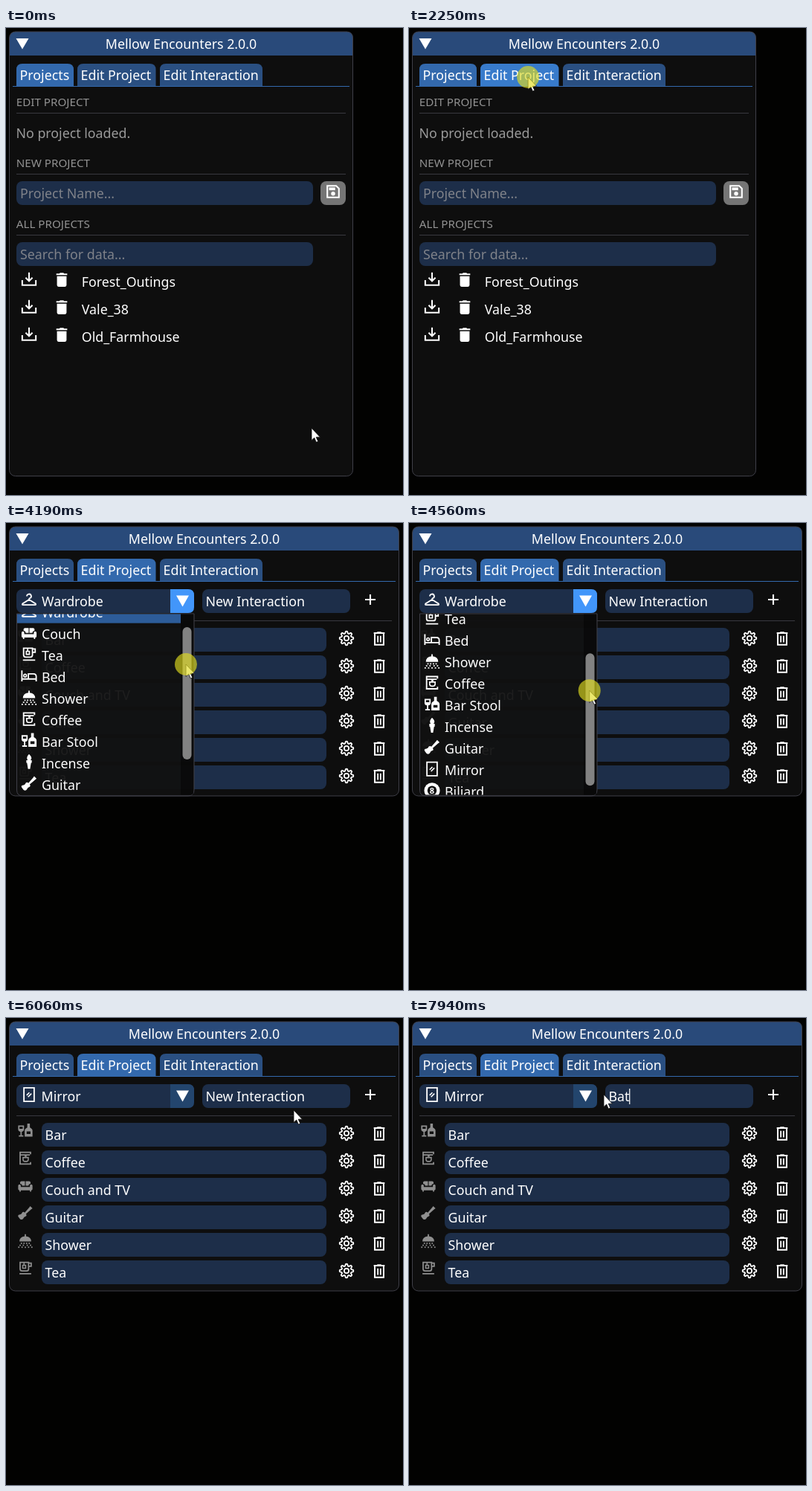
Animation, 534 px wide and 628 px high, one loop 8000 ms. Source, as an HTML page:

```html
<!DOCTYPE html>
<html lang="en">
<head>
<meta charset="utf-8">
<title>Project editor</title>
<style>
  html, body { margin: 0; width: 100%; height: 100%; overflow: hidden; background: #020201; }
  svg { display: block; width: 534px; height: 628px; }
  text { font: 17.8px "Noto Sans", sans-serif; fill: #fff; white-space: pre; }
</style>
</head>
<body>
<svg id="stage" viewBox="0 0 534 628"></svg>
<script>
const LOOP = 8000;
const FRAME = '#1d2e49', FRAME_HOVER = '#23456d', BUTTON = '#23456d', BRIGHT = '#4296fa';
const TAB = '#2a4f81', TAB_ON = '#3369ad', HOVER = '#387bcb', LINE = '#393940', MUTED = '#929292';

// Moments of the interaction
const SWITCH = 2310, OPEN = 3190, GRAB = 4060, DROP = 4920, PICK = 5480, SELECT = 6350;
const TYPED = [[7560, 'B'], [7750, 'Ba'], [7940, 'Bat']];
const CLICKS = [[1600, 1760], [2240, 2330], [3080, 3200], [GRAB, DROP], [5400, 5500], [SELECT, 7150]];
const PATH = [
  [60, 411, 538], [810, 31, 427], [940, 31, 427], [1250, 28, 422], [1690, 28, 422],
  [2230, 160, 66], [2380, 162, 66], [2600, 222, 52], [3060, 193, 119], [3200, 193, 119],
  [3600, 205, 278], [3940, 242, 175], [4080, 242, 175], [4190, 242, 190], [4750, 243, 238],
  [4930, 243, 238], [5190, 167, 308], [5400, 166, 315], [5750, 166, 315], [6060, 387, 124],
  [6250, 408, 108], [6370, 406, 107], [7050, 253, 102], [7300, 262, 103]
];

const rect = (x, y, w, h, fill, r = 0, more = '') =>
  `<rect x="${x}" y="${y}" width="${w}" height="${h}" rx="${r}" fill="${fill}" ${more}/>`;
const text = (x, mid, s, fill = '#fff', more = '') =>
  `<text x="${x}" y="${mid + 6.5}" style="fill:${fill}" ${more}>${s}</text>`;
const hline = (x1, x2, y, color = LINE) =>
  `<path d="M${x1} ${y}H${x2}" stroke="${color}"/>`;
const line = (d, w = 2) => `<path d="${d}" fill="none" stroke="currentColor" stroke-width="${w}"/>`;
const solid = d => `<path d="${d}" fill="currentColor" fill-rule="evenodd"/>`;
const dots = (x, y) => solid(`M${x} ${y}h2v2h-2z`);

function gearPath() {
  let d = '';
  for (let i = 0; i < 64; i++) {
    const a = i * Math.PI / 32, r = 8.7 + 1.5 * Math.tanh(2 * Math.cos(8 * a));
    d += `${i ? 'L' : 'M'}${(12 + r * Math.sin(a)).toFixed(1)} ${(12 - r * Math.cos(a)).toFixed(1)}`;
  }
  return d + 'Z';
}

// Icons on a 24 px grid
const ICONS = {
  hanger: line('M8.8 7a3.2 3.2 0 1 1 4.4 3q-1.2.5-1.2 2L2.5 18q-1.2 1.8.7 1.8h17.6q1.9 0 .7-1.8L12 12'),
  couch: solid('M4 9V7q0-2 2-2h5.4v7H7q0-3-3-3zM20 9V7q0-2-2-2h-5.4v7H17q0-3 3-3zM1 12q0-2 2-2t2 2v2h14v-2q0-2 2-2t2 2v5q0 2-2 2v2h-2v-2H5v2H3v-2q-2 0-2-2z'),
  tea: line('M4 3h13v10q0 3-3 3H7q-3 0-3-3zM17 4h4v5h-4M3 20.5h18') + line('M10 3v4M8 7.5h4.5V12H8z', 1.8),
  bed: line('M1.5 4v16M1.5 16.5h21M22.5 20v-7q0-4-4-4H11v7') + line('M4.2 11.5a2 2 0 1 0 4 0a2 2 0 1 0-4 0', 1.8),
  shower: solid('M3 13q0-7 8-8V2h2v3q8 1 8 8z') +
    [[5, 15], [9, 15], [13, 15], [17, 15], [3, 18], [8, 18], [14, 18], [19, 18], [1, 21], [6, 21], [11, 21], [16, 21], [21, 21]].map(p => dots(...p)).join(''),
  coffee: line('M20 6V3H4v18h16v-3M4 7h15') + line('M8.5 11h8v3q0 3-3 3h-2q-3 0-3-3z', 1.8) + solid('M11 7h3v3h-3z'),
  bar: solid('M1 4h9v6q0 3-3.5 3.6V19H9v2H2v-2h2.5v-5.4Q1 13 1 10zM3 6v3h5V6zM15 1h4v6q4 2 4 5v9H11v-9q0-3 4-5zM14 13v4h6v-4z'),
  incense: solid('M12 0q5 5 3 8l-1 1h2v4h-1l-1.5 9h-3L9 13H8V9h2Q7 5 12 0z'),
  guitar: solid('M19.5 1L23 4.5 21 6l-8 7q2 3-1 4-2 0-3 3-2 3-5 1l-3-4q-1-3 3-3 3-1 3-3 2-2 4 0l7-8z'),
  mirror: line('M4.5 2h15v20h-15z') + line('M8.5 13l4-4M10.5 15.5l5-5', 1.7),
  ball: '<circle cx="12" cy="12" r="11.5" fill="currentColor"/><circle cx="12" cy="12" r="6.8" fill="#111"/>' +
    '<text x="12" y="16.2" text-anchor="middle" style="font-size:12px;font-weight:700">8</text>',
  load: line('M12 2v12M7 9.5l5 5 5-5M2 13v7.5h20V13', 2.2),
  trash: solid('M4 3h4.5l1-1.2h5l1 1.2H20v2.3H4zM5 6.8h14V20q0 2.3-2.3 2.3H7.3Q5 22.3 5 20z'),
  bin: line('M4 4.3h16M9 3.5h6M5.5 5v16.5h13V5', 2.2) + line('M10 8.5v9.5M14 8.5v9.5'),
  gear: line(gearPath(), 2) + '<circle cx="12" cy="12" r="3.4" fill="none" stroke="currentColor" stroke-width="2"/>',
  save: line('M3.5 3.5h13l4 4v13h-17z', 2.3) + solid('M6 6h9v4H6z') + '<circle cx="12" cy="15" r="3" fill="currentColor"/>',
  plus: line('M12 4v16M4 12h16', 2.4)
};
const icon = (name, x, y, color = '#fff', size = 22) =>
  `<g transform="translate(${x - size / 2} ${y - size / 2}) scale(${size / 24})" color="${color}">${ICONS[name]}</g>`;

const PROJECTS = ['Forest_Outings', 'Vale_38', 'Old_Farmhouse'];
const ROWS = [['bar', 'Bar'], ['coffee', 'Coffee'], ['couch', 'Couch and TV'], ['guitar', 'Guitar'], ['shower', 'Shower'], ['tea', 'Tea']];
const KINDS = [['hanger', 'Wardrobe'], ['couch', 'Couch'], ['tea', 'Tea'], ['bed', 'Bed'], ['shower', 'Shower'],
  ['coffee', 'Coffee'], ['bar', 'Bar Stool'], ['incense', 'Incense'], ['guitar', 'Guitar'], ['mirror', 'Mirror'], ['ball', 'Biliard']];
const TABS = [[14, 77, 'Projects'], [96, 105.5, 'Edit Project'], [207, 138, 'Edit Interaction']];
const ITEM_Y = 141, ITEM_H = 29, MAX_SCROLL = 84, SCROLL_RATIO = 1.39;

const section = (mid, s) =>
  `<text x="13.8" y="${mid + 5}" style="font-size:15.2px;fill:${MUTED}">${s}</text>` + hline(14, 457, mid + 14.5);

const projectsView = section(100, 'EDIT PROJECT') + text(13.5, 141, 'No project loaded.', '#9a9a9a') +
  section(182, 'NEW PROJECT') + rect(14, 206, 399, 32, FRAME, 8) + text(19, 222.3, 'Project Name...', '#7f8289') +
  rect(423, 206, 34, 32, '#757575', 8) + icon('save', 440, 220) +
  section(264, 'ALL PROJECTS') + rect(14, 288, 399, 32, FRAME, 8) + text(19, 304.3, 'Search for data...', '#7f8289') +
  PROJECTS.map((name, i) => {
    const y = 341 + 37 * i;
    return rect(14, y - 17, 34, 32, 'none', 7, 'class="load"') + icon('load', 31, y - 3) +
      icon('trash', 75, y - 2.5) + text(101.8, y + .5, name);
  }).join('');

const editView = rect(14, 89, 239, 32, FRAME, 8, 'id="combo"') +
  '<path id="arrow" d="M221 89h24q8 0 8 8v16q0 8-8 8h-24z"/><path d="M229 97.5h17l-8.5 15z" fill="#fff"/>' +
  `<g id="current0">${icon('hanger', 31, 103)}${text(48, 105.3, 'Wardrobe')}</g>` +
  `<g id="current1">${icon('mirror', 31, 103)}${text(47.5, 105.3, 'Mirror')}</g>` +
  rect(264, 89, 199, 32, FRAME, 8) + rect(268, 93, 0, 24, '#2a5387', 0, 'id="selection"') +
  text(268.4, 105.3, 'New Interaction', '#fff', 'id="field"') + rect(296, 95, 1.2, 21, '#fff', 0, 'id="caret"') +
  icon('plus', 490, 103, '#fff', 21) + hline(14, 519, 131.5) +
  ROWS.map(([kind, name], i) => {
    const y = 157 + 37 * i;
    return icon(kind, 26, y - 5.5, '#8f8f8f', 21) + rect(48, y - 16, 383, 32, FRAME, 8) + text(52.6, y + .5, name) +
      icon('gear', 458, y - 2) + icon('bin', 502, y - 2);
  }).join('');

const popup = '<path d="M14.5 122H253v237q0 8-8 8H22.5q-8 0-8-8z" fill="#101010" fill-opacity=".94" stroke="#3f3f48"/>' +
  '<g clip-path="url(#listClip)"><g id="list">' +
  KINDS.map(([kind, name], i) => {
    const y = ITEM_Y + ITEM_H * i;
    return rect(15, y - 14.5, 220, ITEM_H, 'none', 0, 'class="item"') + icon(kind, 31, y - 1.5) + text(48, y + .4, name);
  }).join('') + '</g></g>' +
  rect(235, 122.5, 17, 243, '#050505', 0, 'fill-opacity=".6"') + rect(237.5, 125, 12, 178, '#4f4f4f', 6, 'id="thumb"');

const stage = document.getElementById('stage');
stage.innerHTML = '<defs><clipPath id="listClip"><rect x="15" y="122.5" width="237" height="243"/></clipPath></defs>' +
  rect(5, 5, 462, 598, '#0e0e0e', 8, 'id="win"') + '<path id="bar" fill="#294a7a"/>' +
  '<path d="M13.5 14h17L22 28.5z" fill="#fff"/>' +
  text(236, 21.5, 'Mellow Encounters 2.0.0', '#fff', 'id="title" text-anchor="middle"') +
  TABS.map(([x, w, s]) =>
    `<path class="tab" d="M${x} 78v-22q0-8 8-8h${w - 16}q8 0 8 8v22z"/>` + text(x + 4.6, 63.6, s)).join('') +
  '<path id="tabLine" stroke="#3369ad"/>' +
  `<g id="projects">${projectsView}</g><g id="edit">${editView}</g><g id="popup">${popup}</g>` +
  rect(5, 5, 462, 598, 'none', 8, 'id="border" stroke="#3f3f48"') +
  `<g id="tip">${rect(12.5, 12.5, 122.5, 43, '#111', 8, 'stroke="#44444c"')}${text(21.4, 35, 'Load project')}</g>` +
  '<g id="cursor"><path d="M0 0V16.5L3.7 13l2.6 6 2.5-1.1-2.6-5.7h5.3z" fill="#fff" stroke="#111" stroke-width=".8"/>' +
  '<circle id="press" r="15" fill="#e1dc1e" fill-opacity=".65"/></g>';

const $ = id => document.getElementById(id);
const all = name => [...document.getElementsByClassName(name)];
const tabs = all('tab'), loads = all('load'), items = all('item');
const set = (el, attrs) => { for (const k in attrs) el.setAttribute(k, attrs[k]); };
const show = (el, on) => el.setAttribute('visibility', on ? 'visible' : 'hidden');
const clamp = (v, lo, hi) => Math.max(lo, Math.min(hi, v));
const inside = (p, x, y, w, h) => p.x >= x && p.x < x + w && p.y >= y && p.y < y + h;

function pointer(t) {
  const i = PATH.findIndex(k => k[0] > t);
  if (i <= 0) {
    const [, x, y] = PATH[i ? PATH.length - 1 : 0];
    return { x, y };
  }
  const [t0, x0, y0] = PATH[i - 1], [t1, x1, y1] = PATH[i];
  const u = (t - t0) / (t1 - t0), e = u * u * (3 - 2 * u);
  return { x: x0 + (x1 - x0) * e, y: y0 + (y1 - y0) * e };
}

function drawWindow(p, editing, open) {
  const right = editing ? 528.5 : 466.5, size = { width: right - 4.5, height: editing ? 362 : 597.5, x: 4.5, y: 5 };
  set($('win'), size);
  set($('border'), size);
  set($('bar'), { d: `M5 37V13q0-8 8-8H${right - 8}q8 0 8 8v24z` });
  set($('title'), { x: editing ? 266.5 : 235.5 });
  set($('tabLine'), { d: `M9 78.5H${right - 4.5}` });
  tabs.forEach((tab, i) => {
    const over = !open && inside(p, TABS[i][0], 48, TABS[i][1], 30);
    set(tab, { fill: over ? HOVER : i === +editing ? TAB_ON : TAB });
  });
}

function drawProjects(p, pressed) {
  let hot = false;
  loads.forEach((button, i) => {
    const over = inside(p, 14, 324 + 37 * i, 34, 32);
    hot = hot || over;
    set(button, { fill: over ? (pressed ? '#0f87fa' : BRIGHT) : 'none' });
  });
  return hot;
}

function drawPopup(t, p) {
  const scroll = t < GRAB ? 0 : t > DROP ? MAX_SCROLL : clamp((p.y - 175) * SCROLL_RATIO, 0, MAX_SCROLL);
  const dragging = t >= GRAB && t < DROP;
  set($('list'), { transform: `translate(0 ${-scroll})` });
  items.forEach((item, i) => {
    const top = ITEM_Y + ITEM_H * (i - .5) - scroll;
    const over = !dragging && p.y > 122 && inside(p, 15, top, 220, ITEM_H);
    set(item, { fill: over ? HOVER : i ? 'none' : '#2d5c99' });
  });
  const y = 125 + scroll / SCROLL_RATIO;
  const over = inside(p, 236, y, 15, 178);
  set($('thumb'), { y, fill: dragging ? '#828282' : over ? '#696969' : '#4f4f4f' });
}

function drawField(t, p) {
  const typed = TYPED.filter(([at]) => t >= at).pop();
  const from = t < 7050 ? clamp(268 + 9 * Math.round((p.x - 268) / 9), 268, 402) : 268;
  set($('selection'), { x: from, width: t >= SELECT && !typed ? 402 - from : 0 });
  $('field').textContent = typed ? typed[1] : 'New Interaction';
  show($('caret'), typed);
  if (typed) set($('caret'), { x: 268.2 + $('field').getComputedTextLength() });
}

function render(t) {
  const p = pointer(t), editing = t >= SWITCH, open = t >= OPEN && t < PICK;
  const pressed = CLICKS.some(([a, b]) => t >= a && t < b);
  const overCombo = !open && inside(p, 14, 89, 239, 32);
  drawWindow(p, editing, open);
  // Hidden parents keep their children hidden through display
  $('projects').style.display = editing ? 'none' : '';
  $('edit').style.display = editing ? '' : 'none';
  $('popup').style.display = open ? '' : 'none';
  show($('tip'), drawProjects(p, pressed) && !editing);
  if (open) drawPopup(t, p);
  if (editing) drawField(t, p);
  set($('combo'), { fill: overCombo ? FRAME_HOVER : FRAME });
  set($('arrow'), { fill: overCombo || open ? BRIGHT : BUTTON });
  show($('current0'), t < PICK);
  show($('current1'), t >= PICK);
  const at = { transform: `translate(${p.x.toFixed(1)} ${p.y.toFixed(1)})` };
  set($('cursor'), at);
  set($('tip'), at);
  show($('press'), pressed);
}

let start;
function tick(now) {
  if (start === undefined) start = now;
  render((now - start) % LOOP);
  requestAnimationFrame(tick);
}
render(0);
requestAnimationFrame(tick);
</script>
</body>
</html>
```
